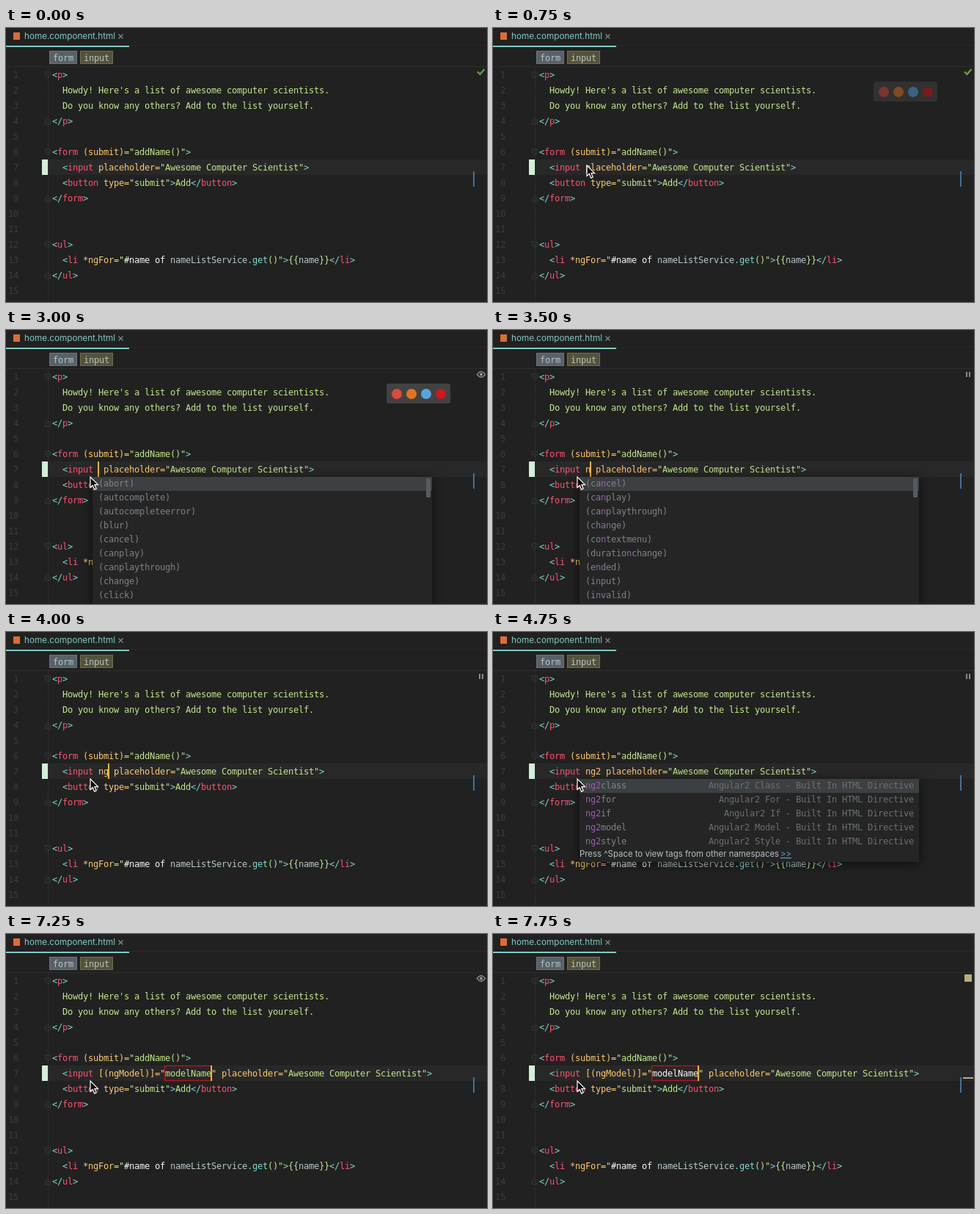
An HTML page that plays this animation: 656x373 px, repeating every 8 s.

```html
<!DOCTYPE html>
<html lang="en">
<head>
<meta charset="utf-8">
<style>
  html, body { margin: 0; width: 100%; height: 100%; overflow: hidden; background: #212121; }
  svg { display: block; }
  text { font: 12px "DejaVu Sans Mono", monospace; letter-spacing: -.225px; white-space: pre; }
  .ui { font: 11.4px Inter, sans-serif; letter-spacing: 0; }
  .c { fill: #80d8d0; } .t { fill: #ff5370; } .a { fill: #ffcb6b; } .s { fill: #c3e88d; }
  .w { fill: #f4f8f8; } .v { fill: #b9c9cf; } .g { fill: #7d8488; } .d { fill: #697074; }
  .m { fill: #9c5fb0; } .n { fill: #3c3c3c; }
</style>
</head>
<body>
<svg width="656" height="373" viewBox="0 0 656 373">
  <g id="base"></g>
  <g id="live"></g>
</svg>
<script>
const LOOP = 8000, CELL = 7, LINE = 21, ROW = 19, LEFT = 77;
const $ = id => document.getElementById(id);
const esc = s => s.replace(/&/g, '&amp;').replace(/</g, '&lt;');

const rect = (x, y, w, h, fill, more = '') =>
  `<rect x="${x}" y="${y}" width="${w}" height="${h}" fill="${fill}" ${more}/>`;
const path = (d, stroke, more = '') => `<path d="${d}" fill="none" stroke="${stroke}" ${more}/>`;
const text = (x, y, cls, s, more = '') => `<text x="${x}" y="${y}" class="${cls}" ${more}>${esc(s)}</text>`;

// Parts are separated by "|"; the first letter of each part is its colour class.
const rich = (x, y, parts) => `<text x="${x}" y="${y}">` + parts.split('|').map(p =>
  `<tspan class="${p[0]}">${esc(p.slice(1))}</tspan>`).join('') + '</text>';
const base = line => 47 + LINE * line;

// Value of the last [time, value] step reached at t.
const at = (steps, t) => steps.filter(s => s[0] <= t).pop()[1];

const code = {
  1: 'c<|tp|c>',
  2: 's  Howdy! Here\'s a list of awesome computer scientists.',
  3: 's  Do you know any others? Add to the list yourself.',
  4: 'c</|tp|c>',
  6: 'c<|tform|a (submit)=|s"addName()"|c>',
  8: 'c  <|tbutton|a type=|s"submit"|c>|sAdd|c</|tbutton|c>',
  9: 'c</|tform|c>',
  12: 'c<|tul|c>',
  13: 'c  <|tli|a *ngFor=|s"|w#name of |vnameListService|c.get|s()"|c>|s{{|vname|s}}|c</|tli|c>',
  14: 'c</|tul|c>'
};

const typed = [[0, ''], [3000, ' '], [3500, ' n'], [3750, ' ng'], [4250, ' ng2'], [5750, ' ng2m'],
  [7250, ' [(ngModel)]="modelName']];
const caret = [[0, 0], [1750, 1], [2250, 0], [2750, 1], [4750, 0], [5250, 1], [6250, 0], [6750, 1]];
const mouse = [[0, null], [250, [134, 178]], [750, [128, 187]], [1000, [115, 192]], [1250, [110, 194]],
  [1500, [111, 191]], [2250, [115, 200]]];
const browsers = [[0, 0], [750, .5], [1000, 1], [3250, 0]];
const status = [[0, 'ok'], [3000, 'eye'], [3250, 'pause'], [7250, 'eye'], [7750, 'warn']];

const events = s => ({ items: s.split(' ').map(e => [`(${e})`, '']) });
const directives = s => ({ hint: true, items: s.split(' ').map(k =>
  ['ng2' + k.toLowerCase(), `Angular2 ${k} - Built In HTML Directive`]) });
const lists = [
  [0, null],
  [3000, { ...events('abort autocomplete autocompleteerror blur cancel canplay canplaythrough change click'), thumb: 26 }],
  [3500, { ...events('cancel canplay canplaythrough change contextmenu durationchange ended input invalid'), thumb: 26, match: 'n' }],
  [3750, { ...events('change durationchange hashchange languagechange playing ratechange readystatechange volumechange waiting'), thumb: 150, match: 'ng' }],
  [4000, null],
  [4250, { ...directives('Class For If Model Style'), match: 'ng2' }],
  [5750, { ...directives('Model'), match: 'ng2m' }],
  [7250, null]
];

const icons = {
  ok: path('M643 59.5l3.5 3.5 6-7', '#5da344', 'stroke-width="2.4"'),
  eye: path('M642.5 60.5q5.5-7.5 11 0q-5.5 7.5-11 0z', '#8a8a8a', 'stroke-width="1.3"') +
    '<circle cx="648" cy="60.5" r="2" fill="#9a9a9a"/>',
  pause: rect(645, 57, 2, 7, '#8a8a8a') + rect(649, 57, 2, 7, '#8a8a8a'),
  warn: rect(643, 55, 10, 10, '#b8ad80') + rect(641, 195, 14, 2, '#b8ad80')
};

function drawBase() {
  let out = rect(0, 0, 656, 373, '#212121') +
    rect(168, 23, 488, 1, '#292929') + rect(0, 52, 656, 1, '#2d2d2d') + rect(0, 24, 168, 2, '#80cbc4') +
    rect(10, 6, 9, 10, '#df6b35') +
    text(25, 15, 'ui', 'home.component.html', 'style="font-size:11.7px" fill="#80cbc4"') +
    path('M153.5 8.5l6 6m0-6l-6 6', '#84908f', 'stroke-width="1.1"') +
    rect(59.5, 31.5, 37, 17, '#596168', 'stroke="#6c747a"') + text(64, 45, '', 'form', 'fill="#b4c4c8"') +
    rect(101.5, 31.5, 44, 17, '#555239', 'stroke="#716d4c"') + text(106, 45, '', 'input', 'fill="#b4c4c8"') +
    rect(57, 179, 599, LINE, '#282828') +
    path('M57.5 53V373', '#303030', 'stroke-dasharray="2 1"') +
    rect(49, 179, 8, LINE, '#d3efd7') + rect(637, 195, 2, 21, '#3f719e');
  for (let i = 1; i <= 15; i++) {
    out += text(17, base(i), 'n', String(i), 'text-anchor="end"');
    if (code[i]) out += rich(63, base(i), code[i]);
  }
  const fold = (line, dir) => path(`M53.5 ${base(line) - 4 - 4 * dir}h7v${5 * dir}l-3.5 ${3 * dir}l-3.5 ${-3 * dir}z` +
    `M55.5 ${base(line) - 4}h3`, '#383838');
  for (const l of [1, 6, 12]) out += fold(l, 1);
  for (const l of [4, 9, 14]) out += fold(l, -1);
  $('base').innerHTML = out;
}

function drawInput(t) {
  const s = at(typed, t), y = base(7), end = LEFT + CELL * (6 + s.length);
  const model = s.includes('=');
  const added = model ? `|a [(ngModel)]=|s"|${t < 7750 ? 's' : 'w'}modelName|s"` : '|a' + s;
  return rich(LEFT, y, `c<|tinput${added}|a placeholder=|s"Awesome Computer Scientist"|c>`) +
    (model ? rect(216.5, 179.5, 64, 20, 'none', 'stroke="#b21818" stroke-width="1.4"') : '') +
    (at(caret, t) ? rect(end - 1, 179, 2, LINE, '#f2b632') : '');
}

function drawList(t) {
  const list = at(lists, t);
  if (!list) return '';
  const { items, match = '', hint, thumb } = list;
  const h = hint ? items.length * ROW + 18 : 180;
  let out = rect(118, 200, 463, h, '#252525', 'style="filter:drop-shadow(0 2px 7px #0009)"') +
    rect(118, 200, 463, ROW, '#3d4042');
  items.forEach(([name, info], i) => {
    const y = 213 + ROW * i, k = name.indexOf(match);
    out += rich(126, y, `g${name.slice(0, k)}|m${match}|g${name.slice(k + match.length)}`) +
      text(574 - CELL * info.length, y, 'd', info);
  });
  if (thumb) out += rect(573, 202, 6, thumb, '#585b5d', 'rx="1.5"');
  if (hint) {
    const y = 211 + items.length * ROW;
    out += text(118, y, 'ui', 'Press ^Space to view tags from other namespaces', 'fill="#b7c0c3"') +
      text(392, y, 'ui', '>>', 'fill="#5a9be8" text-decoration="underline"');
  }
  return out;
}

function drawBrowsers(t) {
  const dots = ['#db4a3a', '#e2741f', '#55a5dc', '#d0161f'].map((c, i) =>
    `<circle cx="${533 + 20 * i}" cy="87" r="7" fill="${c}"/>`).join('');
  return `<g opacity="${at(browsers, t)}">${rect(519, 73, 87, 27, '#424242', 'rx="3"')}${dots}</g>`;
}

function drawMouse(t) {
  const p = at(mouse, t);
  return p ? `<path transform="translate(${p})" d="M0 0v14.5l3.3-3 2.3 5.6 2.6-1.1-2.3-5.4h4.6z"
    fill="#0a0a0a" stroke="#fff" stroke-width="1.2"/>` : '';
}

let shown;
function frame(now) {
  const t = now % LOOP, step = Math.floor(t / 250);
  if (step !== shown) {
    shown = step;
    $('live').innerHTML = drawInput(t) + icons[at(status, t)] + drawBrowsers(t) + drawList(t) + drawMouse(t);
  }
  requestAnimationFrame(frame);
}
drawBase();
frame(0);
</script>
</body>
</html>
```
